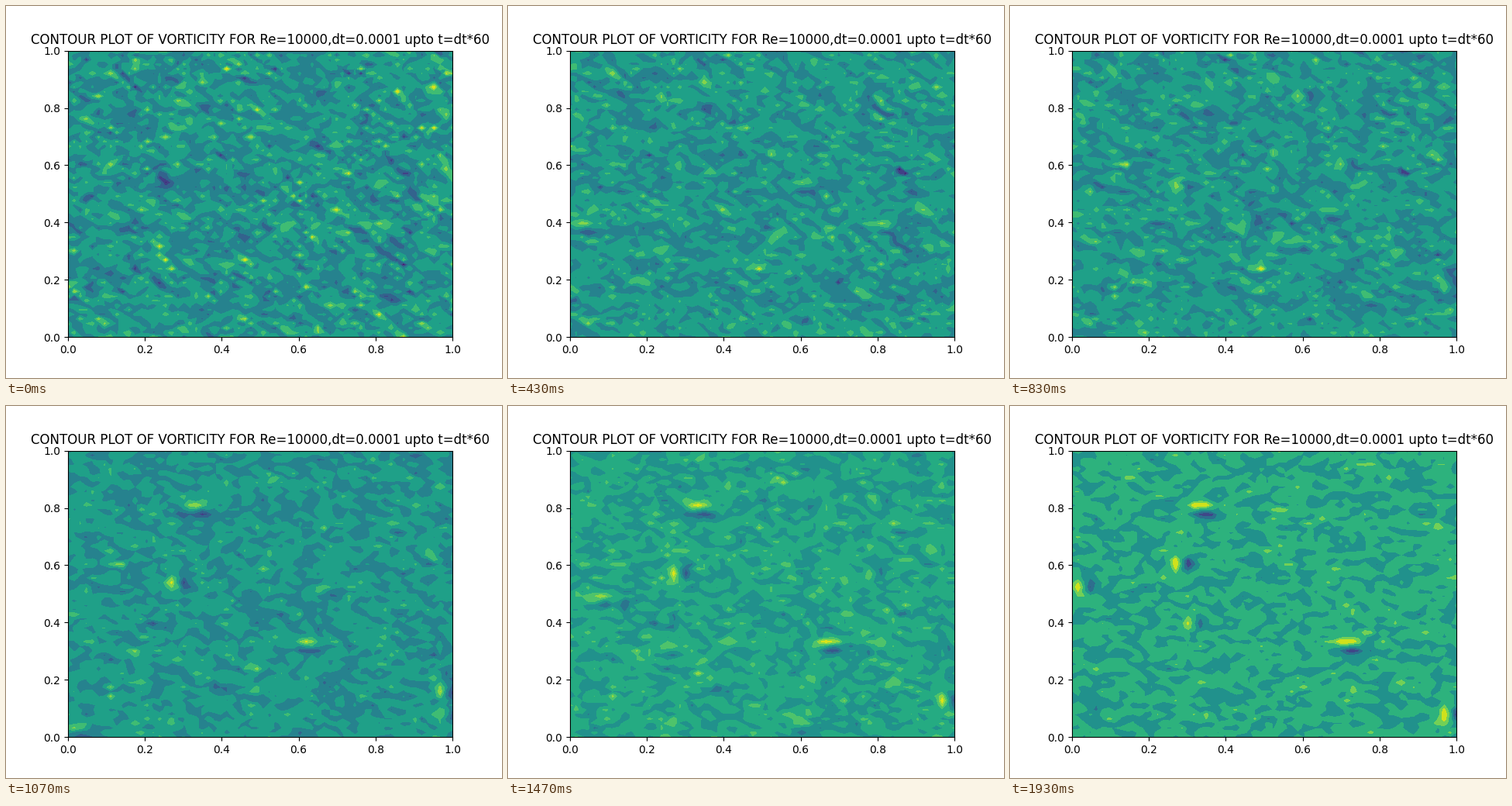
A matplotlib script for the animation above (1960 ms loop, 640 px wide and 480 px high).

```python
import numpy as np
import matplotlib.pyplot as plt
from matplotlib.animation import FuncAnimation

N = 64            # grid points per side
TICKS = 196       # 10 ms ticks in one loop
KNOT = 20         # steps between independent noise fields

rng = np.random.default_rng(60)
axis = np.linspace(0, 1, N)
X, Y = np.meshgrid(axis, axis)

# first step, levels below zero, levels above zero, level spacing
STAGES = [(0, 4, 4, 1.42), (30, 4, 4, 1.9), (36, 5, 4, 1.7), (51, 4, 3, 2.3)]

# lasting eddies at step 44: x, y, drift per step, and whether they lie flat
EDDIES = [(.33, .81, 0, 0, True), (.27, .57, 0, .0025, False),
          (.66, .335, .004, 0, True), (.97, .12, 0, -.003, False)]


def noise(along_x, along_y, diagonal):
    """Unit-variance grid noise, correlated with its neighbours."""
    raw = rng.standard_normal((N, N))
    out = raw.copy()
    for weight, dy, dx in ((along_x, 0, 1), (along_y, 1, 0),
                           (diagonal, -1, 1)):
        out += weight * (np.roll(raw, (dy, dx), (0, 1))
                         + np.roll(raw, (-dy, -dx), (0, 1)))
    return (out - out.mean()) / out.std()


# diagonal grain slowly turns horizontal
FIELDS = [noise(.06 * k, -.06 + .02 * k, .18 - .05 * k) for k in range(4)]

# short-lived eddies: x, y, peak step, height, flatness
BURSTS = [(*rng.random(2), rng.uniform(10, 60), rng.uniform(1.8, 3),
           rng.random() < .6) for _ in range(24)]


def stage(step):
    return [s for s in STAGES if s[0] <= step][-1][1:]


def smooth(u):
    u = np.clip(u, 0, 1)
    return u * u * (3 - 2 * u)


def snap(v):
    return round(v * (N - 1)) / (N - 1)


def add_eddy(z, x, y, flat, height, fade):
    """Pull the field towards a bright core with a dark one beside it."""
    x, y = snap(x), snap(y)
    cell = 1 / (N - 1)
    sx, sy = (1.3, .6) if flat else (.6, 1.1)
    dx, dy = (cell, -2 * cell) if flat else (2 * cell, 0)
    for cx, cy, peak in ((x, y, height), (x + dx, y + dy, -.85 * height)):
        g = fade * np.exp(-((X - cx) / (sx * cell)) ** 2 / 2
                          - ((Y - cy) / (sy * cell)) ** 2 / 2)
        z += g * (peak - z)


def vorticity(step):
    """Field in units of the contour spacing."""
    low, high, spacing = stage(step)
    k, part = divmod(step, KNOT)
    turn = part / KNOT * np.pi / 2
    z = np.cos(turn) * FIELDS[k] + np.sin(turn) * FIELDS[k + 1]
    z *= 1 + .03 * z ** 2                 # heavier tails
    settle = 1 - np.exp(-step / 4)
    z = (z + .14 * settle) / (spacing * (.78 + .22 * settle))
    for x, y, peak, height, flat in BURSTS:
        add_eddy(z, x, y, flat, height, np.exp(-((step - peak) / 6) ** 2))
    for x, y, vx, vy, flat in EDDIES:
        age = step - 44
        add_eddy(z, x + vx * age, y + vy * age, flat, 3.7,
                 smooth((step - 10) / 30))
    return np.clip(z, .01 - low, high - .01)


fig, ax = plt.subplots(figsize=(6.4, 4.8), dpi=100)
ax.set_title("CONTOUR PLOT OF VORTICITY FOR Re=10000,dt=0.0001 upto t=dt*60")
ax.set(xlim=(0, 1), ylim=(0, 1))
shown = {"step": None, "plot": None}


def update(tick):
    step = (2 * tick + 1) * 3 // 20       # 30 steps per second
    if step == shown["step"]:
        return
    if shown["plot"] is not None:
        shown["plot"].remove()
    low, high, _ = stage(step)
    shown["plot"] = ax.contourf(axis, axis, vorticity(step),
                                levels=np.arange(-low, high + 1),
                                cmap="viridis")
    shown["step"] = step


anim = FuncAnimation(fig, update, frames=TICKS, interval=10,
                     init_func=lambda: None, repeat=True, repeat_delay=0)
plt.show()
```
